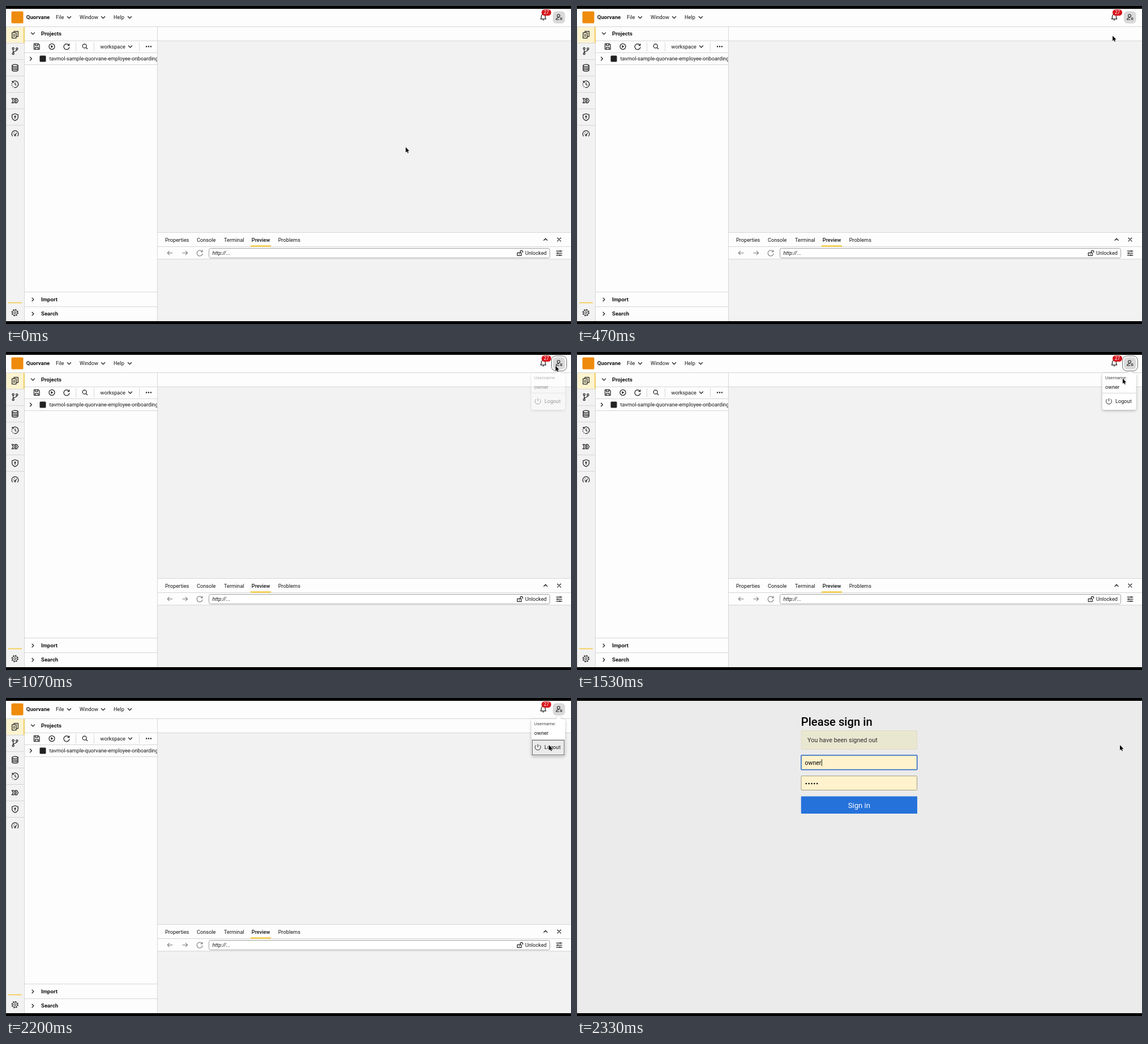
Write an HTML page that moves like this. It is 998 by 561 pixels and loops after 2400 ms.

```html
<!DOCTYPE html>
<html lang="en">
<head>
<meta charset="utf-8">
<title>Sign out</title>
<style>
  html, body { margin: 0; width: 100%; height: 100%; overflow: hidden; background: #000; }
  svg { display: block; width: 100%; height: 100%; }
  text { font: 9.2px Roboto, "Liberation Sans", sans-serif; fill: #151515; white-space: pre; }
  .bold { font-size: 9.6px; font-weight: 700; }
  .line { fill: none; stroke: #d6d6d6; }
  .icon { fill: none; stroke: #222; stroke-width: 1.25; stroke-linejoin: round; }
  .dim { stroke: #777; stroke-width: 1.1; }
  .solid { fill: #222; stroke: none; }
</style>
</head>
<body>
<svg viewBox="0 0 998 561" preserveAspectRatio="none">
  <defs>
    <path id="down" d="M-3.4-1.7 0 1.7 3.4-1.7"/>
    <path id="right" d="M-1.6-3.2 1.6 0-1.6 3.2"/>
    <path id="reload" d="M4-3A5 5 0 1 0 5 .6M4.8-5.4V-2.2H1.6"/>
    <filter id="shadow" x="-30%" y="-30%" width="160%" height="160%">
      <feDropShadow dx="0" dy="1.5" stdDeviation="2.5" flood-opacity=".28"/>
    </filter>
  </defs>

  <g id="workbench">
    <rect y="5" width="998" height="551" fill="#fdfdfd"/>

    <!-- activity bar -->
    <rect y="36" width="32" height="520" fill="#f2f2f2"/>
    <rect y="36" width="32" height="29" fill="#fdf3cf"/>
    <path class="line" d="M0 65.5H32M0 94.5H32M0 123.5H32M0 152.5H32M0 181.5H32M0 210.5H32M32.5 36V556M.5 36V556"/>
    <path d="M31.8 36.5V65M4 523.5H28" stroke="#f5c73a" stroke-width="1.5"/>
    <g class="icon">
      <path transform="translate(16 50.5)" d="M-2-3.5V-6H5.3V3.3H2M-5.3-3.5H2V6H-5.3zM-3.4 0H0M-3.4 2.6H0"/>
      <g transform="translate(15.7 79.5)">
        <circle cx="-3" cy="-4.6" r="1.6"/><circle cx="-3" cy="4.6" r="1.6"/><circle cx="3.6" cy="-4" r="1.6"/>
        <path d="M-3-3V3M3.6-2.4C3.6 1-3 0-3 3"/>
      </g>
      <g transform="translate(16 109)">
        <ellipse cy="-4" rx="5.2" ry="2"/>
        <path d="M-5.2-4V4C-5.2 6.7 5.2 6.7 5.2 4V-4M-5.2-1.3c0 2.7 10.4 2.7 10.4 0M-5.2 1.4c0 2.7 10.4 2.7 10.4 0"/>
      </g>
      <g transform="translate(16 138)">
        <path d="M-4-4.2A5.8 5.8 0 1 1 0 5.8M0-3V.5L2.4 2M-4.8-6V-3.4H-2"/>
        <path d="M0 5.8A5.8 5.8 0 0 1-5.4-2" stroke-dasharray="1.6 1.6"/>
      </g>
      <path transform="translate(16 167)" d="M-5.6-3.9H-2.4L0 0-2.4 3.9H-5.6L-3.2 0zM0-3.9H3.2L5.6 0 3.2 3.9H0L2.4 0z"/>
      <g transform="translate(16 196)">
        <path d="M0-6 5.3-4.2V0C5.3 3 3 5 0 6.2-3 5-5.3 3-5.3 0V-4.2zM0-1V2.8"/>
        <circle class="solid" cy="-1.2" r="1.5"/>
      </g>
      <g transform="translate(16 225.5)">
        <path d="M-4.2 4.4A5.9 5.9 0 1 1 4.2 4.4M.5 1.5 3-2M-3.3 0H-2.3M-1.8-2.8-1.2-2"/>
        <circle cy="2.4" r="1.2"/>
      </g>
      <g transform="translate(15.7 541)">
        <circle r="4.4" stroke-width="1"/><circle r="1.8" stroke-width="1"/>
        <circle r="5.4" stroke-width="1.6" stroke-dasharray="2.12 2.12"/>
      </g>
    </g>

    <!-- projects panel -->
    <text class="bold" x="62" y="51.8">Projects</text>
    <text x="166.5" y="74.8">workspace</text>
    <rect x="59.5" y="87.5" width="11" height="11" rx="1.5" fill="#222"/>
    <text x="76.5" y="96.3">tavmol-sample-quorvane-employee-onboarding</text>
    <text class="bold" x="62" y="521.2">Import</text>
    <text class="bold" x="62" y="546.4">Search</text>
    <path class="line" d="M33 61.5H268M33 82.5H268M33 103.5H268M33 504.5H268M33 530.5H268M123.5 64V80M155.5 64V80M235.5 64V80"/>
    <g class="icon">
      <path transform="translate(54.3 71.5)" d="M-4.8-4.8H3L4.8-3V4.8H-4.8zM-2.6-4.8V-1.8H2V-4.8M-2.6 4.8V1.3H2.6V4.8"/>
      <circle cx="81" cy="71.5" r="5"/>
      <path class="solid" d="M79.4 69V74L83.4 71.5z"/>
      <use href="#reload" x="107" y="71.8"/>
      <circle cx="138.7" cy="70.7" r="3.5"/><path d="M141.3 73.3 144 76"/>
      <use href="#down" x="219.5" y="71.5"/>
      <use href="#down" x="47.5" y="48.3"/>
      <use href="#right" x="43.8" y="93"/>
      <use href="#right" x="47.3" y="517.8"/>
      <use href="#right" x="47.3" y="543"/>
    </g>
    <path d="M248.1 71.5h0M252 71.5h0M255.9 71.5h0" stroke="#222" stroke-width="2.5" stroke-linecap="round"/>

    <!-- editor and preview -->
    <rect x="268" y="36" width="730" height="520" fill="#f2f2f2"/>
    <rect x="268" y="36" width="730" height="25" fill="#fdfdfd"/>
    <rect x="268" y="400" width="730" height="46" fill="#fdfdfd"/>
    <path class="line" d="M0 36.5H998M268 61.5H998M268 399.5H998M268 424.5H998M268 446.5H998M267.5 36V556"/>
    <text x="281" y="415.7">Properties</text>
    <text x="337" y="415.7">Console</text>
    <text x="385" y="415.7">Terminal</text>
    <text x="433.8" y="415.7" font-weight="500" style="font-weight:500">Preview</text>
    <text x="480.8" y="415.7">Problems</text>
    <path d="M432 423.5H468" stroke="#f5c21d" stroke-width="2"/>
    <rect x="358.5" y="427.5" width="602" height="17" rx="3" fill="#fff" stroke="#a0a0a0"/>
    <text x="364.5" y="439.2" style="font-style:italic">http://...</text>
    <text x="917" y="439.2">Unlocked</text>
    <g class="icon">
      <path d="M949.6 413.7 953 410.3 956.4 413.7M973.7 408.8 980.3 415.4M980.3 408.8 973.7 415.4"/>
      <path d="M903.2 435.3h7v5h-7zM908.3 435V433.6a2.2 2.2 0 0 1 4.4 0V435M906.7 437v1.6"/>
      <path d="M971.8 432.4H982.4M971.8 436H982.4M971.8 439.6H982.4M979 431V433.8M974.6 434.6V437.4M978.4 438.2V441"/>
      <g class="dim">
        <path d="M294.4 435.7H285.4M288.8 432.2 285.2 435.7 288.8 439.2M311.4 435.7H320.4M317 432.2 320.6 435.7 317 439.2"/>
        <use href="#reload" x="342.2" y="436"/>
      </g>
    </g>

    <!-- header -->
    <rect x="9.5" y="9.5" width="21" height="21" rx="2" fill="#ef8b0c"/>
    <text class="bold" x="35.8" y="23.3">Quorvane</text>
    <text x="88" y="23.2">File</text>
    <text x="130" y="23.2">Window</text>
    <text x="190" y="23.2">Help</text>
    <g class="icon">
      <use href="#down" x="111.5" y="20"/>
      <use href="#down" x="171.6" y="20"/>
      <use href="#down" x="218.5" y="20"/>
      <path d="M944.3 22.8H953.7L952.5 21V18.4a3.5 3.5 0 0 0-7 0V21zM947.8 24.7H950.2"/>
    </g>
    <rect x="946" y="6" width="17" height="11" rx="5.5" fill="#d6141b"/>
    <text x="954.5" y="14.4" text-anchor="middle" style="font-size:8.2px;fill:#fff">27</text>

    <!-- account -->
    <g id="menu">
      <path d="M928 41a4 4 0 0 1 4-4H972L976.5 32.5 981 37H983.5a4 4 0 0 1 4 4V98a4 4 0 0 1-4 4H932a4 4 0 0 1-4-4z" fill="#fff" filter="url(#shadow)"/>
      <path class="line" d="M928 72.5H987.5"/>
      <rect id="logout" x="929.5" y="74.5" width="56.5" height="26" fill="#ebebeb"/>
      <text x="933" y="48.3" style="font-size:8px;fill:#444">Username:</text>
      <text x="933" y="64.5">owner</text>
      <text x="951" y="90.3">Logout</text>
      <path class="icon" style="stroke-width:1" d="M936.6 83A4.9 4.9 0 1 0 942.4 83M939.5 81.6V86.8"/>
    </g>
    <rect id="ring" x="963.5" y="6.8" width="26.8" height="26.6" rx="8" fill="#fff" stroke="#666"/>
    <rect x="966" y="9.3" width="21.5" height="21.4" rx="6" fill="#d9d9d9"/>
    <g class="icon" style="stroke-width:1.1">
      <circle cx="976" cy="17.2" r="2.4"/>
      <path d="M977 24H971.8C971.8 21.6 973.4 20.8 976.4 20.8M978.6 21.4H982.4M978.6 23.6H982.4"/>
    </g>
  </g>

  <g id="signin">
    <rect y="5" width="998" height="551" fill="#ebebeb"/>
    <path class="line" d="M.5 5V556"/>
    <text x="395.8" y="49" style="font-size:20.2px;font-weight:500;fill:#000">Please sign in</text>
    <rect x="396" y="57.5" width="204.5" height="33" rx="1.5" fill="#eae7d1" stroke="#dfdbc3"/>
    <text x="407" y="77.9" style="font-size:10.9px;fill:#2b2b2b">You have been signed out</text>
    <rect x="396" y="101" width="204.7" height="25.6" rx="1" fill="#fff2cc" stroke="#2463c4" stroke-width="1.5"/>
    <text x="402.5" y="117.8" style="font-size:10.5px;fill:#000">owner</text>
    <path d="M432.4 108V120" stroke="#000" stroke-width=".9"/>
    <rect x="396" y="137.5" width="204.5" height="25" rx="1" fill="#fff2cc" stroke="#a79c80"/>
    <path d="M404.8 151H428" stroke="#000" stroke-width="2.5" stroke-linecap="round" stroke-dasharray="0 4.85"/>
    <rect x="395.8" y="173.5" width="205.2" height="30.5" rx="1" fill="#2672db"/>
    <text x="498.4" y="193.6" text-anchor="middle" style="font-size:13.1px;fill:#fff">Sign in</text>
  </g>

  <path id="cursor" d="M0 0V9.2L2.1 7.3 3.6 10.5 5 9.9 3.6 6.8H6.4z" fill="#000" stroke="#fff" stroke-width=".7" paint-order="stroke"/>
  <path d="M0 0H998V5H0zM0 556H998V561H0z"/>
</svg>
<script>
const LOOP = 2400, STEP = LOOP / 36;
const part = id => document.getElementById(id);
const [workbench, signin, menu, ring, logout, cursor] =
  ["workbench", "signin", "menu", "ring", "logout", "cursor"].map(part);

const clamp = v => Math.min(1, Math.max(0, v));
const smooth = (t, from, to) => {
  const u = clamp((t - from) / (to - from));
  return u * u * (3 - 2 * u);
};
// Critically damped approach from 0 to 1.
const settle = (t, rate) => 1 - (1 + rate * t) * Math.exp(-rate * t);
const show = (el, on) => el.style.display = on ? "" : "none";

function draw(t) {
  const drift = smooth(t, 1070, 1335), descend = smooth(t, 1490, 2010);
  const x = 706 + 265 * settle(t, .0085) - 7 * drift - 5 * descend;
  const y = 249 - 225 * settle(t, .0077) + 22 * drift + 37 * descend;
  cursor.setAttribute("transform", `translate(${x} ${y})`);

  const signedOut = t > 2240, pressed = t > 2110;
  show(workbench, !signedOut);
  show(signin, signedOut);
  show(ring, t > 980 && !pressed);
  show(logout, y > 74 && t > 1500);
  logout.setAttribute("stroke", pressed ? "#555" : "none");
  menu.setAttribute("opacity", clamp((t - 1007) / 150));
}

const start = performance.now();
function tick() {
  const t = (performance.now() - start) % LOOP;
  draw(Math.floor((t + 4) / STEP) % 36 * STEP);
  requestAnimationFrame(tick);
}
tick();
</script>
</body>
</html>
```
